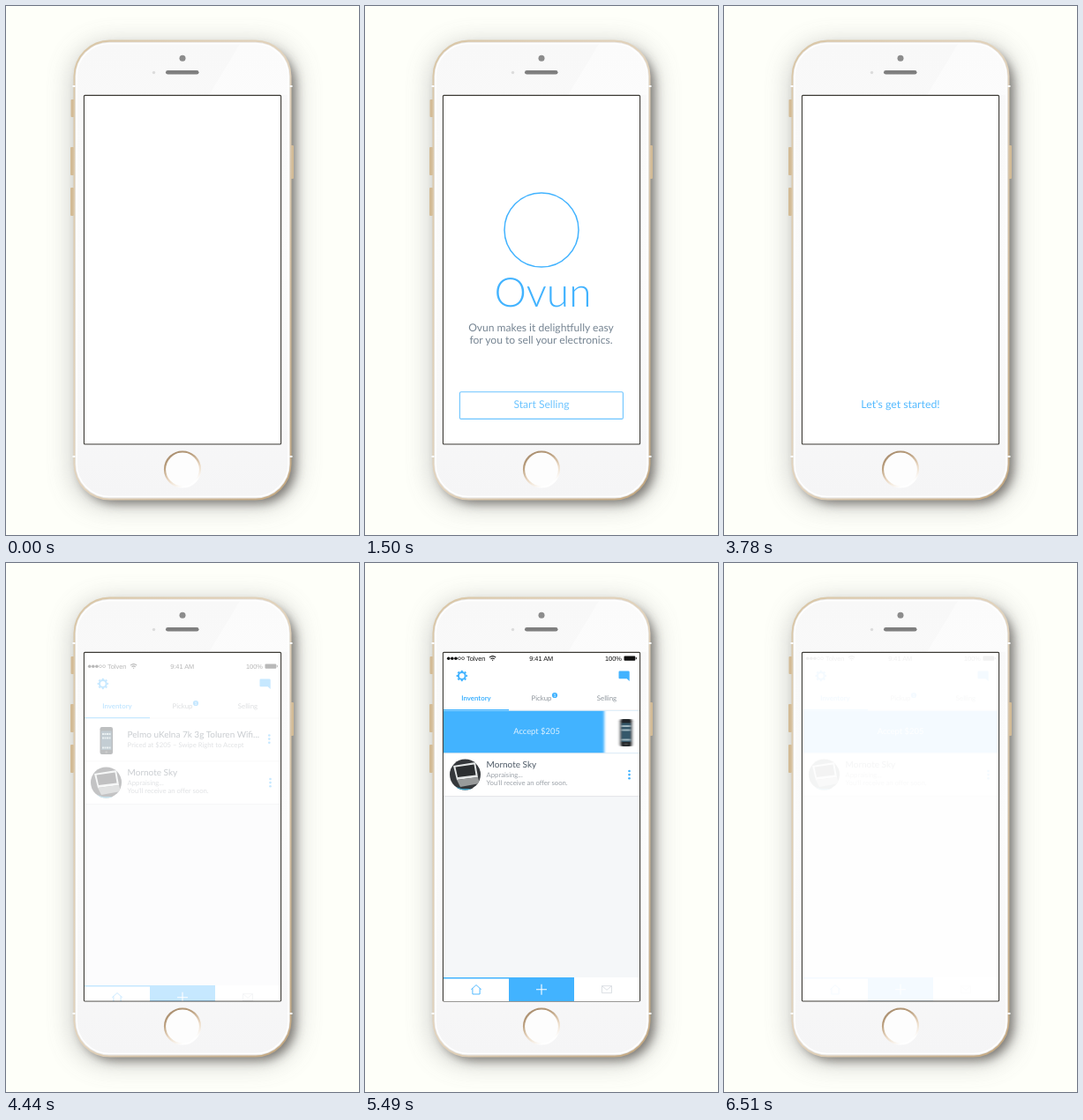
Animation of 400x600 px, one loop 7.17 s. Source, as an HTML page:

```html
<!DOCTYPE html>
<html lang="en">
<head>
<meta charset="utf-8">
<title>Selling app intro</title>
<style>
  html, body { margin: 0; width: 100%; height: 100%; overflow: hidden; background: #fefff9; }
  svg { display: block; width: 400px; height: 600px; }
  text { font-family: Lato, sans-serif; font-size: 12.1px; text-rendering: geometricPrecision; }
  .mid { text-anchor: middle; }
  .blue { fill: #42b3ff; }
  .line { fill: none; stroke: #42b3ff; }
  .status { font: 7.4px "Liberation Sans", sans-serif; fill: #111; }
  .tab { font-size: 7.8px; text-anchor: middle; }
  .name { font-size: 10px; fill: #4c5865; }
  .note { font-size: 7.7px; fill: #9ba1a8; }
</style>
</head>
<body>
<svg viewBox="0 0 400 600">
  <defs>
    <linearGradient id="gold" x2="1" y2="1">
      <stop stop-color="#d9c6a6"/><stop offset=".5" stop-color="#e2d3bd"/><stop offset="1" stop-color="#c2a67f"/>
    </linearGradient>
    <linearGradient id="face" x2="0" y2="1">
      <stop stop-color="#f8f8f8"/><stop offset=".5" stop-color="#fbfbfb"/><stop offset="1" stop-color="#f5f5f6"/>
    </linearGradient>
    <linearGradient id="ring" x2=".5" y2="1">
      <stop stop-color="#a48a6c"/><stop offset=".35" stop-color="#b89c7b"/>
      <stop offset=".7" stop-color="#ead9c4"/><stop offset="1" stop-color="#fff"/>
    </linearGradient>
    <filter id="soft" x="-30%" y="-20%" width="160%" height="140%"><feGaussianBlur stdDeviation="15"/></filter>
    <filter id="near" x="-20%" y="-20%" width="140%" height="140%"><feGaussianBlur stdDeviation="6"/></filter>
    <filter id="smear" x="-5%" width="110%"><feGaussianBlur id="smearBlur" stdDeviation="1 0"/></filter>
    <clipPath id="screen"><rect x="89" y="102" width="222" height="395"/></clipPath>
    <clipPath id="rowClip"><rect x="89" y="167.5" width="222" height="48"/></clipPath>
    <clipPath id="thumb"><circle cx="113.5" cy="240" r="17.5"/></clipPath>
  </defs>

  <!-- phone -->
  <rect width="400" height="600" fill="#fefff9"/>
  <rect x="76" y="44" width="252" height="522" rx="40" fill="#777" opacity=".4" filter="url(#soft)"/>
  <rect x="84" y="48" width="244" height="516" rx="40" fill="#4a4541" opacity=".65" filter="url(#near)"/>
  <g fill="#d3bb96">
    <rect x="73.5" y="106" width="4" height="20" rx="1"/>
    <rect x="73" y="160" width="4" height="32" rx="1"/>
    <rect x="73" y="206" width="4" height="32" rx="1"/>
    <rect x="322.5" y="158" width="3.5" height="38" rx="1"/>
  </g>
  <rect x="76.5" y="38.5" width="247" height="522" rx="41" fill="url(#gold)"/>
  <path d="M75.5 91h4M320.5 91h4M75.5 511h4M320.5 511h4" stroke="#fff" stroke-width="2"/>
  <rect x="78.3" y="40.8" width="243.4" height="517.6" rx="39" fill="#e9e8e7"/>
  <rect x="80" y="42.5" width="240" height="514" rx="37" fill="url(#face)" stroke="#fff" stroke-width="1.6"/>
  <path d="M230 101L265 43H285Q319 46 319 80V101Z" fill="#fff" opacity=".4"/>
  <circle cx="200" cy="59.2" r="3.5" fill="#8c8c8c"/>
  <circle cx="167.5" cy="75.5" r="1.7" fill="#dcdcdc"/>
  <rect x="181" y="73" width="37.5" height="4.6" rx="2.3" fill="#7f7f7f"/>
  <circle cx="200" cy="525.5" r="20" fill="#fdfdfd" stroke="url(#ring)" stroke-width="2.2"/>
  <rect x="88.4" y="101.4" width="223.2" height="395.6" rx="1" fill="#fff" stroke="#3c3a35" stroke-width="1.1"/>

  <g clip-path="url(#screen)">
    <!-- welcome -->
    <circle id="mark" class="line" cx="200" cy="254" r="42" stroke-width="1.5" pathLength="1"/>
    <text id="brand" class="mid blue" x="201.5" y="341" style="font-size:46px;font-weight:300">Ovun</text>
    <g id="tagline" class="mid" fill="#566879">
      <text x="199.5" y="368.5">Ovun makes it delightfully easy</text>
      <text x="199.5" y="383">for you to sell your electronics.</text>
    </g>
    <g id="button">
      <rect class="line" x="107.4" y="437.8" width="185" height="30.6" rx="1.5" stroke-width="1.1"/>
      <text class="mid blue" x="200" y="456.3">Start Selling</text>
    </g>
    <g id="burst" transform="translate(253 461.5)">
      <circle id="hole" fill="#fff"/>
      <path id="rays" class="line" stroke-width="1.6"/>
    </g>
    <text id="started" class="mid blue" x="200" y="456.3" style="font-size:12.3px">Let's get started!</text>

    <!-- inventory -->
    <g id="app">
      <rect x="89" y="167" width="222" height="330" fill="#f5f7f9"/>
      <rect x="89" y="102" width="222" height="162.5" fill="#fff"/>
      <g fill="#111">
        <circle cx="94.7" cy="108.2" r="1.8"/><circle cx="98.8" cy="108.2" r="1.8"/><circle cx="102.9" cy="108.2" r="1.8"/>
        <rect x="293.5" y="105.5" width="12.8" height="5.2" rx="1"/><rect x="306.8" y="107" width="1" height="2.2"/>
      </g>
      <g fill="none" stroke="#111">
        <circle cx="107" cy="108.2" r="1.5" stroke-width=".6"/><circle cx="111.1" cy="108.2" r="1.5" stroke-width=".6"/>
        <path d="M141 107.2q3.6-3.2 7.2 0M142.5 108.9q2.1-1.9 4.2 0M144 110.3h1.2" stroke-width="1.1"/>
      </g>
      <text class="status" x="115" y="110.8">Tolven</text>
      <text class="status mid" x="199.7" y="110.8">9:41 AM</text>
      <text class="status" x="272" y="110.8">100%</text>
      <circle class="line" cx="109.8" cy="128" r="3.9" stroke-width="2"/>
      <circle class="line" cx="109.8" cy="128" r="5.4" stroke-width="1.6" pathLength="16" stroke-dasharray="1" stroke-dashoffset=".5"/>
      <path class="blue" d="M288.5 122.5h10q1.2 0 1.2 1.2V134l-3-2.8h-8.2q-1 0-1-1v-6.5q0-1.2 1-1.2Z"/>
      <text class="tab blue" x="126" y="155.8" font-weight="700">Inventory</text>
      <text class="tab" x="200" y="155.8" fill="#8e959c">Pickup</text>
      <text class="tab" x="274" y="155.8" fill="#8e959c">Selling</text>
      <circle class="blue" cx="215" cy="150" r="3.1"/>
      <text class="mid" x="215" y="151.8" style="font-size:5px" fill="#fff">1</text>
      <path d="M163 167.2h148M89 215.7h222M89 264.6h222" stroke="#e1e4e7" stroke-width=".9"/>
      <path class="line" d="M89 166.7h74" stroke-width="1.4"/>

      <g clip-path="url(#rowClip)">
        <rect id="accept" class="blue" x="89" y="167.5" width="222" height="48"/>
        <text id="acceptText" class="mid" y="194" style="font-size:9.4px" fill="#fff">Accept $205</text>
        <g id="row">
          <rect x="89" y="160" width="240" height="64" fill="#fff"/>
          <rect x="106.5" y="177" width="14.5" height="31" rx="2.2" fill="#24282c"/>
          <rect x="107.8" y="181.5" width="11.9" height="21.5" fill="#35586b"/>
          <path d="M109 185h9.5M109 189.5h9.5M109 200.5h9.5" stroke="#b9cdd3" stroke-width="2" stroke-dasharray="2 .5"/>
          <circle cx="113.7" cy="205.5" r="1.3" fill="#555"/>
          <text class="name" x="137.6" y="189">Pelmo uKelna 7k 3g Toluren Wifi...</text>
          <text class="note" x="137.6" y="200">Priced at $205 – Swipe Right to Accept</text>
          <g class="blue"><circle cx="298.3" cy="186.5" r="1.3"/><circle cx="298.3" cy="190.6" r="1.3"/><circle cx="298.3" cy="194.7" r="1.3"/></g>
        </g>
      </g>

      <g clip-path="url(#thumb)">
        <rect x="96" y="222" width="36" height="36" fill="#35383b"/>
        <path d="M100 230L125 226L128 243L104 246Z" fill="#e3e6e6"/>
        <path d="M102.500 231.500L123.500 228.500L125.500 240.500L105 243Z" fill="#2b2e30"/>
        <path d="M104 246L128 243L130 250L108 254Z" fill="#999b9b"/>
        <path d="M96 252L110 256H126V260H96Z" fill="#3f9fc4"/>
      </g>
      <text class="name" x="137.6" y="232.300">Mornote Sky</text>
      <text class="note" x="137.6" y="243.200">Appraising...</text>
      <text class="note" x="137.6" y="251.800">You'll receive an offer soon.</text>
      <g class="blue"><circle cx="299.500" cy="236" r="1.3"/><circle cx="299.500" cy="240.100" r="1.3"/><circle cx="299.500" cy="244.200" r="1.3"/></g>

      <rect x="89" y="470" width="222" height="28" fill="#fff"/>
      <rect class="blue" x="163" y="470" width="74" height="28"/>
      <path class="line" d="M89 470.800h74" stroke-width="1.6"/>
      <path class="line" d="M120.300 483.800L126 478.600L131.700 483.800M121.900 482.500V489H130.100V482.500" stroke-width=".9"/>
      <path d="M194 483.700h12M200 477.700v12" stroke="#fff" stroke-width="1.1"/>
      <path d="M268.500 479.700h11v8h-11zl5.500 4.600l5.500-4.600" fill="none" stroke="#d9dde1" stroke-width=".9"/>
    </g>
  </g>
</svg>
<script>
const LOOP = 7170;
const el = id => document.getElementById(id);
const set = (id, attrs) => {
  for (const key in attrs) el(id).setAttribute(key, attrs[key]);
};
const ramp = (t, from, to) => Math.min(1, Math.max(0, (t - from) / (to - from)));
const outCubic = p => 1 - (1 - p) ** 3;
const inOut = (p, power) => p < .5 ? (2 * p) ** power / 2 : 1 - (2 - 2 * p) ** power / 2;

function rise(id, shown, hidden, distance) {
  set(id, {
    opacity: shown * (1 - hidden),
    transform: `translate(0 ${distance * (1 - outCubic(shown))})`
  });
}

function drawWelcome(t) {
  const leave = ramp(t, 2550, 2880);
  const drawn = inOut(ramp(t, 150, 870), 2) - inOut(ramp(t, 2520, 3210), 2);
  set('mark', { 'stroke-dasharray': `${drawn} 2`, opacity: drawn > .001 ? 1 : 0 });
  rise('brand', ramp(t, 450, 1000), leave, 42);
  rise('tagline', ramp(t, 870, 1650), leave, 20);
  set('button', { opacity: ramp(t, 990, 1650) * (1 - leave) });
  set('started', { opacity: ramp(t, 2580, 2910) - ramp(t, 3750, 4050) });
}

function drawBurst(t) {
  const p = ramp(t, 2200, 2820);
  const inner = 28 * p ** .64, outer = 28 * outCubic(p);
  let rays = '';
  for (let i = 0; i < 8; i++) {
    const angle = i * Math.PI / 4, scale = i % 2 ? .77 : 1;
    const x = Math.cos(angle) * scale, y = Math.sin(angle) * scale;
    rays += `M${x * inner} ${y * inner}L${x * outer} ${y * outer}`;
  }
  set('burst', { opacity: p > 0 && p < 1 ? 1 : 0 });
  set('hole', { r: inner });
  set('rays', { d: rays });
}

function drawApp(t) {
  const enter = ramp(t, 4230, 4950);
  const fade = t < 5500 ? enter : Math.max(.05, 1 - ramp(t, 5910, 6540));
  set('app', { opacity: fade, transform: `translate(0 ${18 * (1 - enter) ** 2})` });

  const swipe = time => inOut(ramp(time, 5100, 5740), 4);
  const p = swipe(t), speed = (swipe(t + 15) - swipe(t - 15)) * 223;
  set('row', { transform: `translate(${223 * p} 0)`, filter: speed > 1 ? 'url(#smear)' : 'none' });
  set('smearBlur', { stdDeviation: `${Math.max(.1, speed / 14)} 0` });
  set('accept', { opacity: p > 0 ? 1 : 0 });
  set('acceptText', { x: 200 - 30 * (1 - p), opacity: p });
}

function frame() {
  const t = performance.now() % LOOP;
  drawWelcome(t);
  drawBurst(t);
  drawApp(t);
  requestAnimationFrame(frame);
}
frame();
</script>
</body>
</html>
```
